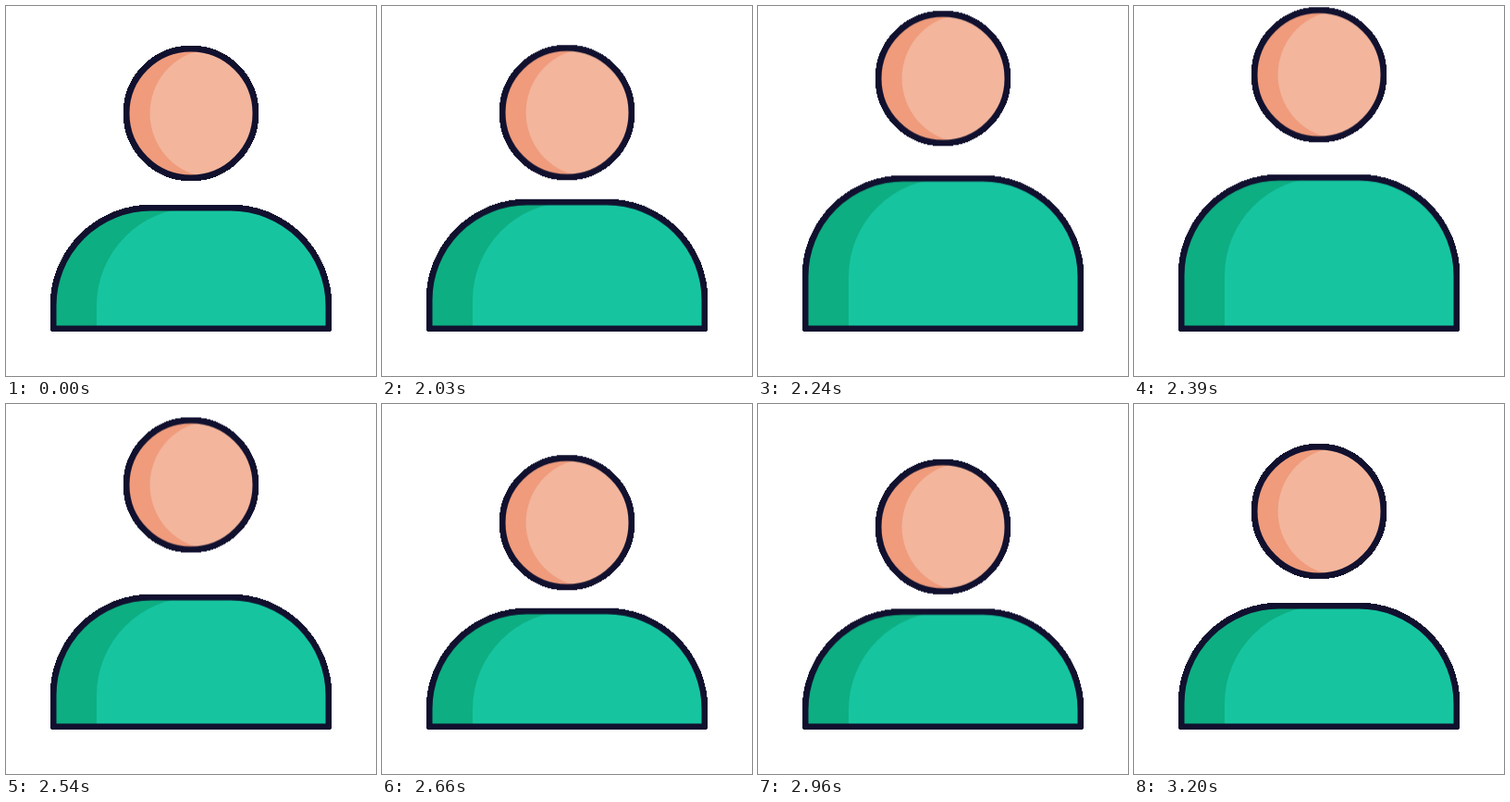
An HTML page without scripts that plays this animation: 400x400 px, repeating every 3230 ms.

```html
<!DOCTYPE html>
<html lang="en">
<head>
<meta charset="utf-8">
<title>Bouncing avatar</title>
<style>
  html, body { margin: 0; width: 100%; height: 100%; overflow: hidden; background: #fff; }
  svg { display: block; width: 100%; height: 100%; }

  .line, .edge { fill: none; stroke: #11112f; stroke-width: 6.5; stroke-linecap: round; }
  /* Hard outer rim; the fills cover its inner half. */
  .edge { stroke-width: 7.2; shape-rendering: crispEdges; }
  .skin { fill: #f3b59c; }
  .skin-shade { fill: #ef9b7c; }
  .shirt { fill: #16c5a0; }
  .shirt-shade { fill: #0dae82; }

  .head { animation: head 3230ms infinite; }
  .body { animation: body 3230ms infinite; }

  @keyframes head {
    0% { transform: translateY(0); animation-timing-function: linear; }
    61.92% { transform: translateY(0); animation-timing-function: cubic-bezier(.37, 0, .11, 1); }
    74.3% { transform: translateY(-41.7px); animation-timing-function: cubic-bezier(.66, 0, .17, 1); }
    86.69% { transform: translateY(17.9px); animation-timing-function: linear; }
    88.24% { transform: translateY(18px); animation-timing-function: cubic-bezier(.84, 0, .35, 1); }
    99.07%, 100% { transform: translateY(0); }
  }

  /* The shoulders lead the head and start with a hard step. */
  @keyframes body {
    0% { transform: translateY(0); animation-timing-function: linear; }
    62.84% { transform: translateY(0); animation-timing-function: step-end; }
    62.85% { transform: translateY(-6px); animation-timing-function: cubic-bezier(.33, 1, .68, 1); }
    73% { transform: translateY(-33px); animation-timing-function: cubic-bezier(.66, 0, .17, 1); }
    85.29% { transform: translateY(7.2px); animation-timing-function: linear; }
    86.84% { transform: translateY(7.3px); animation-timing-function: cubic-bezier(.84, 0, .35, 1); }
    99.07%, 100% { transform: translateY(0); }
  }
</style>
</head>
<body>
<svg viewBox="0 0 400 400">
  <defs>
    <clipPath id="above-base"><rect width="400" height="349"/></clipPath>
    <path id="shoulders" d="M51.25 440V324a105.75 105.75 0 0 1 105.75-105.75H243a105.75 105.75 0 0 1 105.75 105.75V440"/>
    <path id="base" d="M51.25 348.75H348.75"/>
    <circle id="face" cx="200" cy="116" r="69.75"/>
  </defs>

  <use href="#base" class="edge"/>
  <g clip-path="url(#above-base)">
    <g class="body">
      <use href="#shoulders" class="edge"/>
      <use href="#shoulders" class="shirt-shade"/>
      <path class="shirt" d="M98 440V324a105.75 105.75 0 0 1 105.75-105.75H243a105.75 105.75 0 0 1 105.75 105.75V440"/>
      <use href="#shoulders" class="line"/>
    </g>
  </g>
  <use href="#base" class="line"/>

  <g class="head">
    <use href="#face" class="edge"/>
    <use href="#face" class="skin-shade"/>
    <path class="skin" d="M212.7 47.4A69.75 69.75 0 0 1 212.7 184.6A69.75 69.75 0 0 1 212.7 47.4"/>
    <use href="#face" class="line"/>
  </g>
</svg>
</body>
</html>
```
